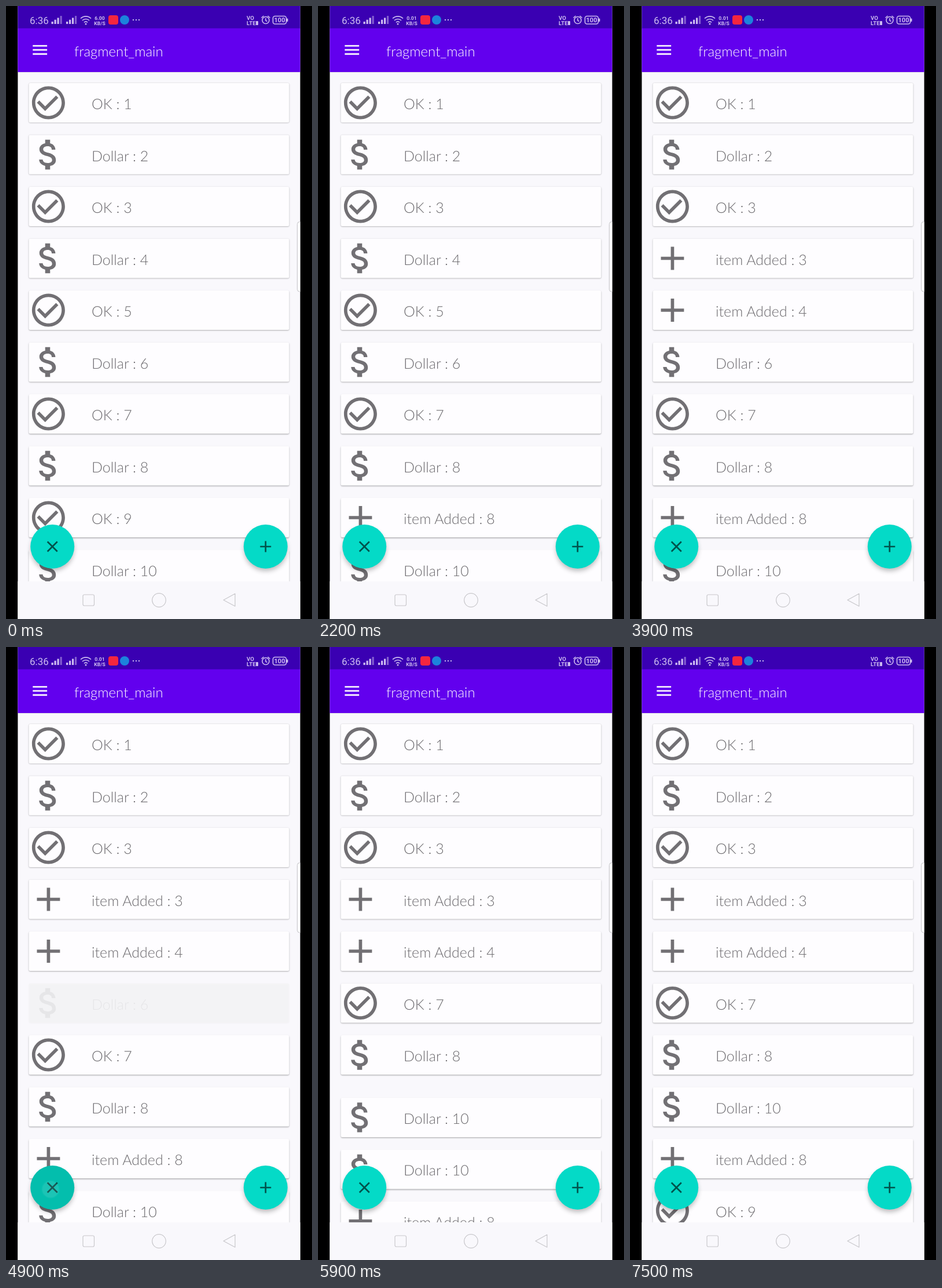
These frames come from a looping animation (529 px wide and 1058 px high, 8000 ms). An HTML page:

```html
<!DOCTYPE html>
<html lang="en">
<head>
<meta charset="utf-8">
<title>fragment_main</title>
<style>
  html, body { margin: 0; width: 100%; height: 100%; overflow: hidden; background: #000; }
  svg { display: block; width: 100%; height: 100%; text-rendering: geometricPrecision; }
  .row text, .title { font: 300 25px Lato, "Open Sans", sans-serif; fill: #6b696d; }
  .row path { fill: #727074; }
  .title { font-size: 24px; fill: #fff; }
  .status { font-family: Roboto, sans-serif; fill: #cdbcf0; }
  .tiny { font-size: 8.6px; font-weight: 700; }
  .net { font-size: 9.6px; font-weight: 700; }
  .line { fill: none; stroke: #cdbcf0; stroke-width: 1.6; }
  .nav { fill: none; stroke: #c9c8cc; stroke-width: 1.2; }
</style>
</head>
<body>
<svg viewBox="0 0 529 1058">
  <defs>
    <filter id="soft" x="-5%" y="-20%" width="110%" height="140%"><feGaussianBlur stdDeviation="1.1"/></filter>
    <filter id="wide" x="-40%" y="-40%" width="180%" height="180%"><feGaussianBlur stdDeviation="4.5"/></filter>
    <clipPath id="screen"><rect x="20.400" width="488.200" height="1058"/></clipPath>
  </defs>
  <g clip-path="url(#screen)">
    <rect x="20" width="489" height="1058" fill="#f9f8fc"/>
    <g id="backs"></g>
    <g id="rows"></g>

    <rect x="20" y="111" width="489" height="3.500" opacity=".12" filter="url(#soft)"/>
    <rect x="20" y="38" width="489" height="76" fill="#6200ee"/>
    <rect x="20" width="489" height="38.500" fill="#3a00b2"/>
    <path d="M46.300 68.700h24.800M46.300 75.800h24.800M46.300 82.900h24.800" stroke="#fff" stroke-width="2.600"/>
    <text class="title" x="118" y="87">fragment_main</text>

    <g class="status">
      <text x="41" y="30.500" font-size="17">6:36</text>
      <g id="bars"></g>
      <path class="line" d="M129 21.500a13 13 0 0 1 18 0M132 25a8.500 8.500 0 0 1 12 0M135 28.300a4.500 4.500 0 0 1 6 0"/>
      <circle cx="138" cy="31" r="1.500"/>
      <text class="tiny" id="speed" x="162" y="23.500" text-anchor="middle"></text>
      <text class="tiny" x="162" y="32.500" text-anchor="middle">KB/S</text>
      <rect x="177" y="16" width="17" height="16" rx="4" fill="#f5263f"/>
      <circle cx="205" cy="24" r="8" fill="#1c83dc"/>
      <path d="M219 24h2m3 0h2m3 0h2" stroke="#cdbcf0" stroke-width="2"/>
      <text class="net" x="416" y="24">VO</text>
      <text class="net" x="416" y="33">LTE</text>
      <rect x="432" y="26" width="4" height="7" rx="1"/>
      <circle class="line" cx="449" cy="24.500" r="6"/>
      <path class="line" d="M441.500 20.500l4-3.500M456.500 20.500l-4-3.500M449 21v4l2.500 1.700"/>
      <rect class="line" x="461.500" y="17.500" width="23" height="13.500" rx="3.500"/>
      <rect x="485" y="21.500" width="2.500" height="5.500" rx="1"/>
      <text x="473" y="28.300" font-size="11" font-weight="700" text-anchor="middle">100</text>
    </g>

    <rect x="503.500" y="372.500" width="14" height="120.500" rx="4" fill="#fcfcfd" stroke="#c4c3c7"/>
    <rect x="20" y="993" width="489" height="65" fill="#f9f8fc"/>
    <g class="nav">
      <rect x="133" y="1016" width="19.500" height="19" rx="2.500"/>
      <circle cx="264.500" cy="1025.500" r="11.800"/>
      <path d="M376 1025.200L396 1014.300V1036Z" stroke-linejoin="round"/>
    </g>
    <g id="fabs"></g>
    <g id="touch" fill="#fff">
      <circle r="16" opacity=".18"/>
      <circle r="14.300" opacity=".5"/>
    </g>
  </g>
</svg>
<script>
const LOOP = 8000, STEP = 100, PITCH = 89.5, TOP = 133;
const $ = id => document.getElementById(id);

const ICONS = {
  OK: 'M16.59 7.58L10 14.17l-3.59-3.58L5 12l5 5 8-8zM12 2C6.48 2 2 6.48 2 12s4.48 10 10 10 10-4.48 10-10S17.52 2 12 2zm0 18c-4.42 0-8-3.58-8-8s3.58-8 8-8 8 3.58 8 8-3.58 8-8 8z',
  Dollar: 'M11.8 10.9c-2.27-.59-3-1.2-3-2.15 0-1.09 1.01-1.85 2.7-1.85 1.78 0 2.44.85 2.5 2.1h2.21c-.07-1.72-1.12-3.3-3.21-3.81V3h-3v2.16c-1.94.42-3.5 1.68-3.5 3.61 0 2.31 1.91 3.46 4.7 4.13 2.5.6 3 1.48 3 2.41 0 .69-.49 1.79-2.7 1.79-2.06 0-2.87-.92-2.98-2.1h-2.2c.12 2.19 1.76 3.42 3.68 3.83V21h3v-2.15c1.95-.37 3.5-1.5 3.5-3.55 0-2.84-2.43-3.81-4.7-4.4z',
  'item Added': 'M19 13h-6v6h-2v-6H5v-2h6V5h2v6h6v2z',
  close: 'M19 6.41L17.59 5 12 10.59 6.41 5 5 6.41 10.59 12 5 17.59 6.41 19 12 13.41 17.59 19 19 17.59 13.41 12z'
};
const START = ['OK 1', 'Dollar 2', 'OK 3', 'Dollar 4', 'OK 5', 'Dollar 6', 'OK 7',
  'Dollar 8', 'OK 9', 'Dollar 10', 'Dollar 10', 'item Added 8', 'OK 9'];
const TAPS = [
  { at: 900, add: 8, x: 454, y: 937 },
  { at: 1800, add: 8, x: 454, y: 937 },
  { at: 2500, add: 3, x: 454, y: 937 },
  { at: 3500, add: 4, x: 454, y: 937 },
  { at: 4700, remove: 5, x: 77, y: 936 },
  { at: 5500, remove: 7, x: 99, y: 946 },
  { at: 6900, remove: 8, x: 76, y: 934 }
];
const SPEEDS = [[0, '6.00'], [1800, '0.01'], [6200, '4.00']];

function el(tag, attrs, parent) {
  const node = document.createElementNS('http://www.w3.org/2000/svg', tag);
  for (const key in attrs) node.setAttribute(key, attrs[key]);
  return parent.appendChild(node);
}
const set = (node, key, value) => node.setAttribute(key, value);
const clamp = v => Math.min(1, Math.max(0, v));
// Smooth start and stop between two times
const ease = (t, from, to) => (1 - Math.cos(Math.PI * clamp((t - from) / (to - from)))) / 2;

function makeRow(name, slot, born) {
  const cut = name.lastIndexOf(' '), kind = name.slice(0, cut);
  const back = el('g', {}, $('backs'));
  const box = { x: 39.5, width: 450, height: 68, rx: 2.5 };
  const shade = el('rect', { ...box, filter: 'url(#soft)' }, back);
  const face = el('rect', box, back);
  const body = el('g', { class: 'row' }, $('rows'));
  el('path', { d: ICONS[kind], transform: 'translate(39.2 -.2) scale(2.85)' }, body);
  el('text', { x: 148, y: 45 }, body).textContent = kind + ' : ' + name.slice(cut + 1);
  return { back, shade, face, body, slot, born, moves: [] };
}

// Replay the taps once to learn when each row appears, leaves and moves
const list = START.map((name, i) => makeRow(name, i));
const all = [...list];
for (const { at, add, remove } of TAPS) {
  if (add !== undefined) {
    list[add].out = [at + 100, at + 360];
    all.push(list[add] = makeRow('item Added ' + add, add, [at + 100, at + 360]));
  } else {
    list.splice(remove, 1)[0].out = [at + 100, at + 225];
    list.slice(remove).forEach(row => row.moves.push(at + 225));
  }
}

function drawRow(row, t) {
  let alpha = row.born ? ease(t, ...row.born) : 1;
  if (row.out) alpha *= 1 - ease(t, ...row.out);
  const shown = alpha > 0.001;
  for (const node of [row.back, row.body]) node.style.display = shown ? '' : 'none';
  if (!shown) return;
  const slot = row.moves.reduce((s, m) => s - ease(t, m, m + 250), row.slot);
  const place = `translate(0 ${TOP + slot * PITCH})`;
  set(row.back, 'transform', place);
  set(row.body, 'transform', place);
  set(row.body, 'opacity', alpha);
  set(row.shade, 'y', 0.4 + slot * 0.13);
  set(row.shade, 'opacity', 0.3 * alpha);
  set(row.face, 'fill', alpha < 1 ? '#f5f5f6' : '#fefdff');
  set(row.face, 'opacity', clamp(alpha * 8));
}

function makeFab(x, icon) {
  const fab = el('g', { transform: `translate(${x} 933)` }, $('fabs'));
  el('circle', { r: 37, cy: 5, opacity: 0.27, filter: 'url(#wide)' }, fab);
  el('circle', { r: 38, fill: '#04dac7' }, fab);
  const dim = el('circle', { r: 38, opacity: 0 }, fab);
  el('path', { d: icon, opacity: 0.62, transform: 'scale(1.357) translate(-12 -12)' }, fab);
  return dim;
}
const removeDim = makeFab(80.2, ICONS.close), addDim = makeFab(448.8, ICONS['item Added']);

[78.5, 104].forEach(x => {
  for (let i = 0; i < 4; i++) {
    const h = 4 + i * 3.3;
    el('rect', { x: x + i * 5, y: 31 - h, width: 3.2, height: h, opacity: i < 3 ? 1 : 0.5 }, $('bars'));
  }
});

function drawTap(t) {
  const tap = TAPS.find(p => t >= p.at && t < p.at + 500);
  const age = tap ? t - tap.at : 0;
  const dark = tap ? 0.13 * clamp(age / 200) * clamp((400 - age) / 200) : 0;
  const adding = tap && tap.add !== undefined;
  set(addDim, 'opacity', adding ? dark : 0);
  set(removeDim, 'opacity', adding ? 0 : dark);
  set($('touch'), 'opacity', tap ? clamp((230 - age) / 180) : 0);
  if (tap) set($('touch'), 'transform', `translate(${tap.x} ${tap.y})`);
}

function draw(t) {
  all.forEach(row => drawRow(row, t));
  drawTap(t);
  $('speed').textContent = SPEEDS.filter(s => s[0] <= t).pop()[1];
}

const begin = performance.now();
function tick() {
  const t = (performance.now() - begin) % LOOP;
  draw(Math.floor(t / STEP) * STEP);
  requestAnimationFrame(tick);
}
tick();
</script>
</body>
</html>
```
